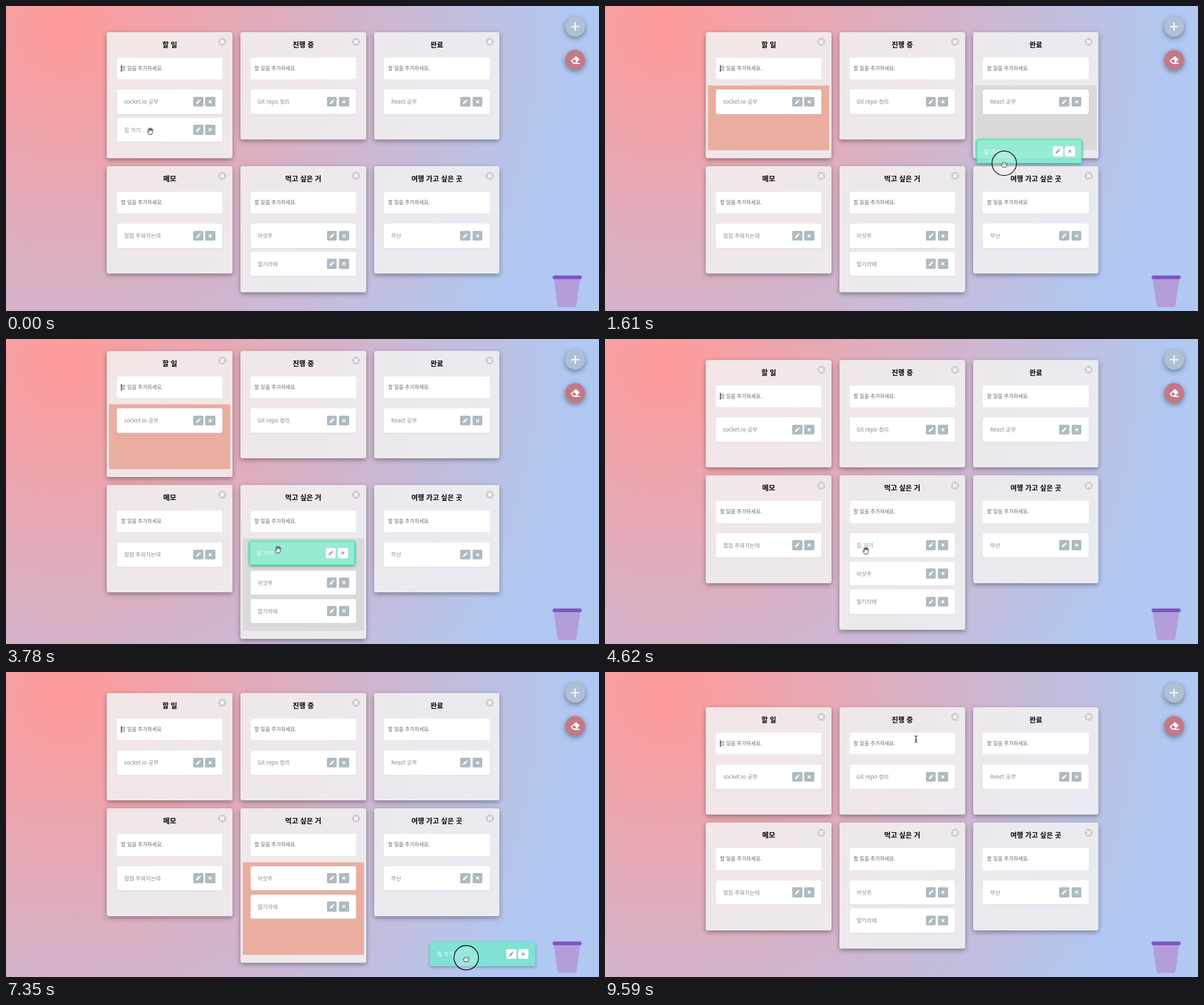
Animation, 1042 px wide and 537 px high, one loop 9730 ms. Source, as an HTML page:

```html
<!DOCTYPE html>
<html lang="ko">
<head>
<meta charset="utf-8">
<title>할 일 보드</title>
<style>
  html, body { margin: 0; width: 100%; height: 100%; overflow: hidden; }
  body {
    position: relative;
    background: radial-gradient(circle at 104px 45px, #ff9a99, #b0c8f2 900px);
    font-family: "Noto Sans CJK KR", "Noto Sans CJK", "Noto Sans", sans-serif;
  }
  .card, .card > *, .item, .button, .layer { position: absolute; box-sizing: border-box; }
  .card {
    width: 220.6px; border-radius: 4px; background: rgba(242, 242, 242, .85);
    box-shadow: 0 3px 8px rgba(0, 0, 0, .36);
  }
  h2 { left: 0; top: 12px; width: 100%; margin: 0; font-size: 12.3px; line-height: 20px; text-align: center; color: #000; }
  .close { left: 196px; top: 10.5px; width: 14px; height: 14px; border-radius: 50%; background: #cbcdcd; color: #fff; }
  .zone { left: 3.5px; top: 94.5px; width: 213.6px; bottom: 14px; }
  .field, .item { left: 17.5px; width: 185.5px; background: #fff; border-radius: 3px; white-space: nowrap; }
  .field { top: 45px; height: 38.5px; padding-left: 7px; font-size: 9px; line-height: 38px; color: #666; }
  .caret { left: 24.5px; top: 58.5px; width: 1px; height: 11.5px; background: #111; }
  .item {
    height: 42.5px; padding-left: 12.5px; font-size: 9.6px; line-height: 42px; color: #8b8b8b;
    box-shadow: 0 1px 3px rgba(205, 210, 225, .5);
  }
  .button { top: 12.5px; width: 17.5px; height: 17.5px; border-radius: 2px; background: #afbac1; color: #fff; }
  .edit { left: 134.3px; }
  .remove { left: 155.5px; }
  .button svg, .close svg { display: block; width: 100%; height: 100%; }
  .held { color: #fff; }
  .held .button { background: #fff; color: #9aa5a8; }
  .layer { left: 0; top: 0; width: 1042px; height: 537px; }
  .fab { filter: drop-shadow(0 3px 5px rgba(0, 0, 0, .4)); }
</style>
</head>
<body>
<svg class="layer" viewBox="0 0 1042 537">
  <circle class="fab" cx="1000" cy="36.5" r="17.5" fill="#b0c0d4"/>
  <path d="M1000 30v13M993.5 36.5h13" stroke="#fff" stroke-width="2.2" stroke-linecap="round"/>
  <circle class="fab" cx="1000" cy="95" r="17.5" fill="#c37987"/>
  <g transform="translate(1000 95)" fill="#fff" stroke="#fff" stroke-linejoin="round">
    <path d="M-7.5 1.5 1.5-6.5 7.5-1 1 6h-4.5z"/>
    <path d="M0 6h7.5" stroke-width="1.8" stroke-linecap="round"/>
    <path d="M-5.5 1.6-2-1.5 2.3 2.6.3 4.4h-3z" fill="#c37987" stroke="none"/>
  </g>
  <g id="full">
    <circle cx="986" cy="498" r="45" fill="#fff" opacity=".2"/>
    <path d="M963 475l14-8 5 2 8-7 17 13z" fill="#ff8a65"/>
    <path d="M963 475l14-8 11 8z" fill="#ffab91"/>
  </g>
  <path id="bin" d="M962.5 480h46.5l-6.5 46q-.6 4-4.5 4h-24.5q-3.9 0-4.5-4z"/>
  <rect x="960.5" y="474.5" width="51" height="6.5" rx="3" fill="#7e57c2"/>
</svg>
<svg class="layer" viewBox="0 0 1042 537" style="z-index: 3">
  <g id="cursor" fill="#fff" stroke="#000" stroke-width=".8" stroke-linejoin="round">
    <circle id="press" cy="-2" r="21.5" fill-opacity=".18" stroke-width="1.3"/>
    <path id="open" d="M-3 6.5c-.6-1.6-2-2.9-2.8-4.3-.5-1 .8-1.7 1.7-.8l1 1-1.3-5c-.3-1.4 1.2-1.7 1.6-.5l.8 2.6-.3-4c0-1.3 1.6-1.3 1.7 0l.4 3.8.7-3.6c.3-1.2 1.8-.9 1.6.3l-.5 3.9 1.1-2.4c.6-1 1.8-.4 1.4.7-.9 2.9-.6 5.6-2.1 8.3z"/>
    <path id="closed" d="M-2.8 4.8c-.5-1.3-2.3-2.2-2-4 .1-.9 1-1.2 1.6-.6-.6-2.7.7-3.6 2-2.6.6-1 1.7-1 2.2 0 .7-.8 1.8-.5 2 .3 1-.6 1.9 0 1.8 1.2-.1 2-.6 4-1.6 5.7zM-.8-.9v1.3M1-.9v1.3M2.8-.7v1.2"/>
    <path id="arrow" d="M0 0v11l2.6-2.3 1.6 3.8 1.6-.7-1.6-3.7h3.4z" fill="#000" stroke="#fff"/>
    <path id="beam" d="M-2.5-5.5q2.5 0 2.5 1.5 0-1.5 2.5-1.5M0-4v8M-2.5 5.5q2.5 0 2.5-1.5 0 1.5 2.5 1.5M-1.5 1.5h3" fill="none" stroke-width="1"/>
  </g>
</svg>
<script>
const LOOP = 9730, TRASH = 6, NONE = -1;
const ITEM_LAG = 40, SENSE_LAG = 88;
const COLUMN = 234.65, LEFT = 177.4, CARD_WIDTH = 220.6;
const INSET = 17.5, SLOT_TOP = 101.5, SLOT = 49.7, ROW_GAP = 14;

const lists = [
  ['할 일', 'socket.io 공부'],
  ['진행 중', 'Git repo 정리'],
  ['완료', 'React 공부'],
  ['메모', '점점 추워지는데'],
  ['먹고 싶은 거', '아샷추', '딸기라떼'],
  ['여행 가고 싶은 곳', '부산'],
];

const drags = [
  { start: 350, release: 3640, end: 4000, grip: [59, 23] },
  { start: 5040, release: 8820, end: 8960, grip: [29, 30] },
];

// Each gesture passes its points at even intervals; the pointer rests in between
const gestures = [
  { start: 350, step: 310, points: [[254, 220], [560, 100], [770, 440], [745, 180], [707, 267],
    [580, 487], [230, 400], [459, 369], [480, 370]] },
  { start: 3640, step: 910, points: [[480, 370], [459, 372]] },
  { start: 5040, step: 245, points: [[459, 372], [590, 372], [690, 390], [790, 455], [881, 519],
    [905, 510], [673, 490], [895, 503], [860, 505], [733, 505]] },
  { start: 7245, step: 105, points: [[733, 505], [808, 505], [880, 507]] },
  { start: 8890, step: 560, points: [[880, 507], [546.5, 118]] },
];

const $ = id => document.getElementById(id);
const show = (node, visible) => { node.style.display = visible ? '' : 'none'; };
const clamp = (v, max = 1) => Math.min(max, Math.max(0, v));
const easeOut = v => 1 - (1 - v) ** 3;
const linear = v => v;
const rowOf = list => Math.floor(list / 3);
const columnX = list => LEFT + COLUMN * (list % 3);

// Cubic Hermite through the points, with flat tangents at ends and turning points
function pointerAt(t) {
  const { start, step, points } = gestures.findLast(g => g.start <= t) ?? gestures[0];
  const position = clamp((t - start) / step, points.length - 1);
  const i = Math.min(Math.floor(position), points.length - 2), u = position - i;
  const tangent = (k, axis) => {
    const [a, b, c] = [k - 1, k, k + 1].map(n => points[n]?.[axis]);
    return (b - a) * (c - b) > 0 ? (c - a) / 2 : 0;
  };
  return [0, 1].map(axis => {
    const a = points[i][axis], b = points[i + 1][axis];
    return a + (b - a) * u * u * (3 - 2 * u)
      + u * (1 - u) * ((1 - u) * tangent(i, axis) - u * tangent(i + 1, axis));
  });
}

function heldAt(drag, t) {
  const pointer = pointerAt(Math.max(drag.start, t));
  return pointer.map((v, axis) => v - drag.grip[axis]);
}

// List and index under the centre of an item at x, y
function targetAt([x, y]) {
  const centerX = x + 93, centerY = y + 21;
  if (centerX > 900 && centerY > 440) return [TRASH, 0];
  const column = Math.floor((centerX - LEFT) / COLUMN);
  const offset = centerX - columnX(column) - CARD_WIDTH / 2;
  if (column < 0 || column > 2 || Math.abs(offset) > 95 || centerY > 450) return [NONE, 0];
  const row = centerY > 272 ? 1 : 0;
  return [row * 3 + column, centerY > 168 + row * 236 ? 1 : 0];
}

// Moments when the drop target changes: time, list, index
const hover = [[0, 0, 1]];
for (const drag of drags) {
  for (let t = drag.start; t < drag.release; t += 5) {
    const [list, index] = targetAt(heldAt(drag, t - SENSE_LAG));
    const [, lastList, lastIndex] = hover.at(-1);
    if (list !== lastList || index !== lastIndex) hover.push([t, list, index]);
  }
}

// Value from 0 to 1 that settles on wanted(list, index) after each target change
function follow(t, wanted, openMs, closeMs = openMs, curve = easeOut) {
  let value = +wanted(hover[0][1], hover[0][2]);
  hover.forEach(([start, list, index], i) => {
    if (t < start) return;
    const until = Math.min(t, hover[i + 1]?.[0] ?? t);
    const goal = +wanted(list, index);
    value += (goal - value) * curve(clamp((until - start) / (goal > value ? openMs : closeMs)));
  });
  return value;
}

const crossIcon = (half, weight) => `<svg viewBox="${-half} ${-half} ${2 * half} ${2 * half}">
  <path d="M-2.3-2.3 2.3 2.3M2.3-2.3-2.3 2.3" stroke="currentColor" stroke-width="${weight}"/></svg>`;
const pencilIcon = `<svg viewBox="-8.5 -8.5 17 17"><path fill="currentColor"
  d="M-4 4l.7-2.8 4.4-4.4 2.1 2.1-4.4 4.4zM1.8-3.9l.8-.8 2.1 2.1-.8.8z"/></svg>`;

function make(parent, className, html = '') {
  const node = document.createElement('div');
  node.className = className;
  node.innerHTML = html;
  return parent.appendChild(node);
}

const makeItem = (parent, text) => make(parent, 'item',
  `${text}<div class="button edit">${pencilIcon}</div><div class="button remove">${crossIcon(8.5, 1.5)}</div>`);

const cards = lists.map(([title, ...tasks], i) => {
  const node = make(document.body, 'card', `<h2>${title}</h2><div class="close">${crossIcon(5, 1.4)}</div>`);
  node.style.left = columnX(i) + 'px';
  const zone = make(node, 'zone');
  make(node, 'field', '할 일을 추가하세요.');
  return { node, zone, items: tasks.map(task => makeItem(node, task)) };
});
const caret = make(cards[0].node, 'caret');
const mover = makeItem(document.body, '집 가기');
mover.style.zIndex = 2;

function layout(t, home) {
  const heights = lists.map((list, i) => {
    const room = i === home ? 1 : follow(t, over => over === i, 1, 200);
    return Math.max(189.5, 122.6 + SLOT * (list.length - 1 + room));
  });
  const upper = Math.max(...heights.slice(0, 3)), lower = Math.max(...heights.slice(3));
  const top = 274.5 - (upper + ROW_GAP + lower) / 2;
  return { heights, tops: [top, top + upper + ROW_GAP] };
}

function drawMover(t, drag, home, tops) {
  show(mover, home !== NONE);
  if (home === NONE) return;
  const slot = (list, index) => [columnX(list) + INSET, tops[rowOf(list)] + SLOT_TOP + SLOT * index];
  let place = home === 0 ? slot(0, 1) : slot(4, 0);
  if (drag) {
    place = heldAt(drag, Math.min(t, drag.release) - ITEM_LAG);
    if (drag === drags[0]) {
      const landing = slot(4, 0), p = easeOut(clamp((t - drag.release) / (drag.end - drag.release)));
      place = place.map((v, axis) => v + (landing[axis] - v) * p);
    }
  }
  const glow = follow(t, over => over !== NONE, 200);
  mover.classList.toggle('held', !!drag);
  mover.style.left = place[0] + 'px';
  mover.style.top = place[1] + 'px';
  mover.style.background = drag ? `rgba(${120 + 22 * glow}, ${230 + 8 * glow}, 210, .88)` : '';
  mover.style.boxShadow = drag ? `0 2px 5px rgba(0, 0, 0, .3), 0 0 4px rgba(29, 233, 182, ${glow}),
    inset 0 0 0 1.5px rgba(70, 240, 195, ${glow * .8})` : '';
}

function drawCursor(t, drag) {
  const pressed = drag && t < drag.release;
  const shape = t >= 9380 ? 'beam' : t >= drags[1].release ? 'arrow' : pressed ? 'closed' : 'open';
  $('cursor').setAttribute('transform', `translate(${pointerAt(t)})`);
  for (const id of ['open', 'closed', 'arrow', 'beam']) show($(id), id === shape);
  show($('press'), pressed);
}

function draw(t) {
  const drag = drags.find(d => t >= d.start && t < d.end);
  const home = t < drags[0].end ? 0 : t < drags[1].end ? 4 : NONE;
  const over = hover.findLast(([start]) => start <= t)[1];
  const { heights, tops } = layout(t, home);

  cards.forEach(({ node, zone, items }, i) => {
    node.style.top = tops[rowOf(i)] + 'px';
    node.style.height = heights[i] + 'px';
    const isSource = i === home && over !== i;
    zone.style.background = isSource ? '#eaaea0' : '#dadada';
    zone.style.opacity = !drag ? 0 : isSource ? 1 : follow(t, list => list === i, 80, 300, linear);
    items.forEach((item, k) => {
      const gap = follow(t, (list, index) => list === i && k >= index, 200);
      item.style.top = SLOT_TOP + SLOT * (k + gap) + 'px';
    });
  });

  const overTrash = drag && over === TRASH;
  show($('full'), overTrash);
  $('bin').style.fill = overTrash ? '#7e57c2' : '#b39ddb';
  show(caret, ![140, 4900, 9310].some(off => t >= off && t < off + 280));
  drawMover(t, drag, home, tops);
  drawCursor(t, drag);
}

function tick() {
  draw(performance.now() % LOOP);
  requestAnimationFrame(tick);
}
tick();
</script>
</body>
</html>
```
